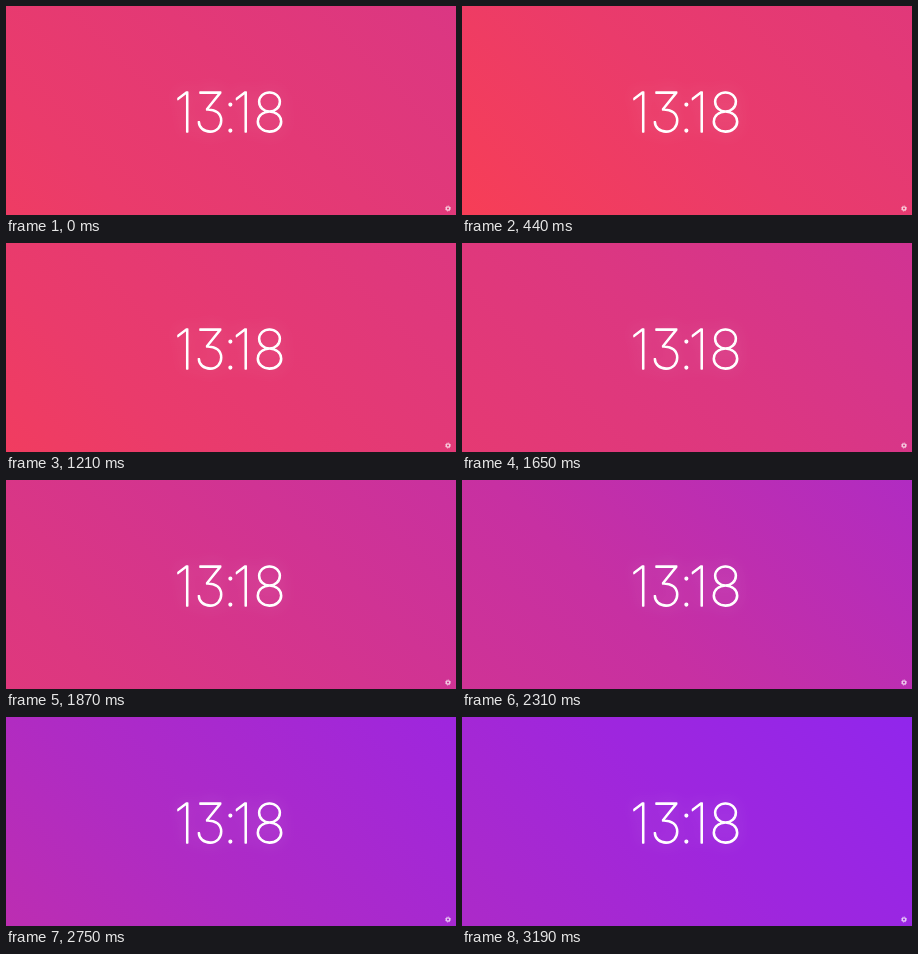
An HTML page for the animation above (3300 ms loop, 450 by 209 pixels).

```html
<!DOCTYPE html>
<html lang="en">
<head>
<meta charset="utf-8">
<title>Clock</title>
<style>
  html, body { margin: 0; width: 100%; height: 100%; overflow: hidden; background: #e43a70; }
  svg { display: block; width: 100vw; height: 100vh; }
  .time {
    font: 100 54.5px Inter, "Open Sans", sans-serif;
    font-feature-settings: "cv09" 1, "calt" 0;
    text-anchor: middle;
    fill: #fff;
    stroke: #fff;
    stroke-width: 1.3;
    stroke-linejoin: round;
    filter: drop-shadow(0 0 8px rgba(255, 255, 255, .22));
  }
  .gear { fill: none; stroke: #fff; opacity: .75; }
</style>
</head>
<body>
<svg viewBox="0 0 450 209" preserveAspectRatio="none">
  <defs>
    <linearGradient id="sky" gradientUnits="userSpaceOnUse" x1="0" y1="209" x2="2040" y2="-1831">
      <stop offset=".16" stop-color="rgb(248,62,84)"/>
      <stop offset=".25" stop-color="rgb(234,59,107)"/>
      <stop offset=".37" stop-color="rgb(220,55,129)"/>
      <stop offset=".52" stop-color="rgb(199,48,162)"/>
      <stop offset=".63" stop-color="rgb(175,43,196)"/>
      <stop offset=".73" stop-color="rgb(158,38,222)"/>
      <stop offset=".82" stop-color="rgb(143,38,238)"/>
    </linearGradient>
  </defs>
  <rect width="450" height="209" fill="url(#sky)"/>
  <text class="time" x="178 204 224.3 236.5 263.4" y="126.3">13:18</text>
  <g class="gear" transform="translate(442 202.5)">
    <circle r="1.7" stroke-width="1.3"/>
    <circle r="2.6" stroke-width=".8" stroke-dasharray="1.02"/>
  </g>
</svg>
<script>
  const LOOP = 3300, STEP = 110;
  const TURN = 650, SWEEP = 3000;        // time of the reddest point, length of one sweep
  const NEAR = 333, TRAVEL = 1044;       // gradient shift along each axis
  const sky = document.getElementById("sky");

  function draw(ms) {
    const t = Math.floor((ms % LOOP) / STEP) * STEP;
    const progress = (1 - Math.cos(Math.PI * (t - TURN) / SWEEP)) / 2;
    const shift = NEAR + TRAVEL * progress;
    sky.setAttribute("gradientTransform", `translate(${-shift} ${shift})`);
  }

  const start = performance.now();
  function tick() {
    draw(performance.now() - start);
    requestAnimationFrame(tick);
  }
  tick();
</script>
</body>
</html>
```
